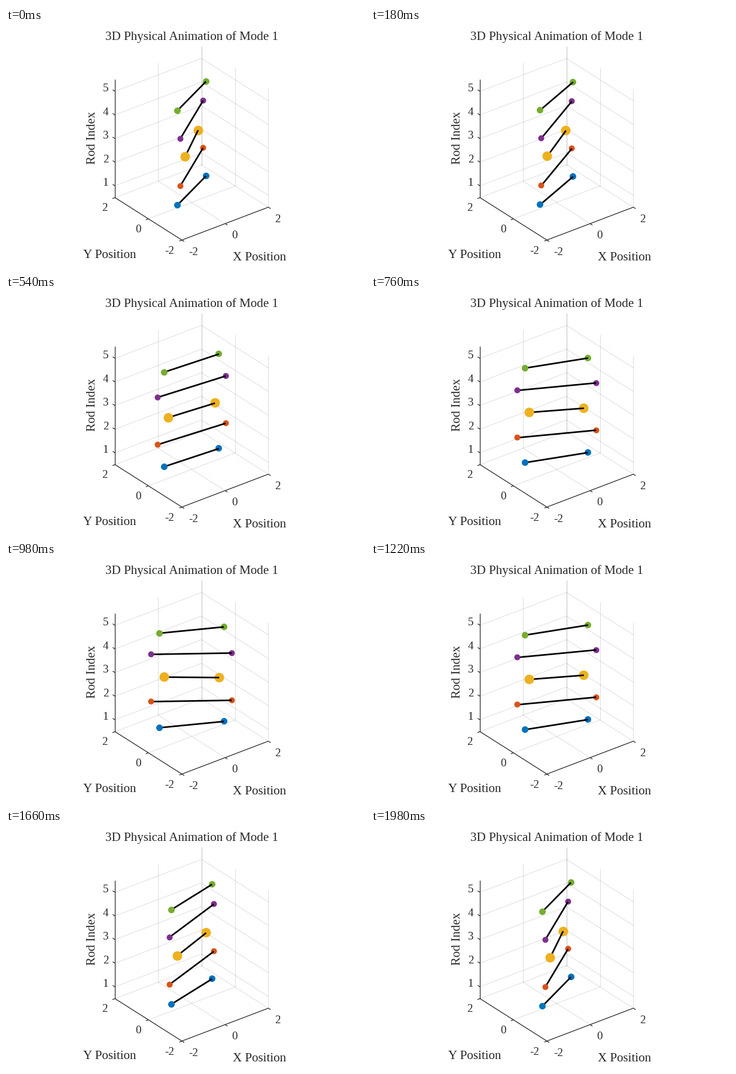
These frames come from a looping animation (600x400 px, 2000 ms). A matplotlib script:

```python
import numpy as np
import matplotlib.pyplot as plt
from matplotlib.animation import FuncAnimation
from matplotlib.patches import Circle

W, H, DPI = 600, 400, 100
FRAMES, INTERVAL = 100, 20
PT = 72 / DPI  # points per pixel
INK = "#262626"

# Orthographic projection: screen vectors of one data unit
CENTER = np.array([310.3, 291.9])
UX = np.array([36.125, -13.75])
UY = np.array([-27.95, -17.75])
UZ = np.array([0.0, -39.55])
ZMIN, ZMAX, LIM = 0.5, 5.5, 2
TICKS = (-2, 0, 2)
LEVELS = range(1, 6)

COLORS = ["#0072BD", "#D95319", "#EDB120", "#7E2F8E", "#77AC30"]
HALF_LENGTHS = [1.205, 1.475, 1.007, 1.475, 1.205]
SWINGS = np.radians([26.5, 35.9, 38.7, 35.9, 26.5])
DIAMETERS = [11, 10, 16, 10, 11]

plt.rcParams["font.family"] = "Liberation Serif"
fig = plt.figure(figsize=(W / DPI, H / DPI), dpi=DPI, facecolor="white")
ax = fig.add_axes([0, 0, 1, 1])
ax.set_xlim(0, W)
ax.set_ylim(H, 0)
ax.axis("off")


def project(x, y, z):
    return CENTER + x * UX + y * UY + (z - ZMIN) * UZ


def segment(p, q, **style):
    ax.plot(*zip(p, q), solid_capstyle="butt", **style)


def grid(*corners):
    points = [project(*c) for c in corners]
    ax.plot(*zip(*points), color=INK, alpha=0.15, lw=PT, zorder=1)


def axis_line(start, end):
    segment(project(*start), project(*end), color=INK, lw=1.2 * PT, zorder=2)


def tick(point, direction):
    p = project(*point)
    segment(p, p + 4.6 * direction / np.hypot(*direction),
            color=INK, lw=1.2 * PT, zorder=2)


def label(x, baseline, text, size=21, ha="center", **kw):
    ax.text(x, baseline, text, size=size * PT, color=INK,
            ha=ha, va="baseline", **kw)


def tick_label(point, offset, value, ha):
    label(*(project(*point) + offset), str(value), 19, ha)


def draw_box():
    for t in TICKS:
        grid((t, -LIM, ZMIN), (t, LIM, ZMIN))
        grid((-LIM, t, ZMIN), (LIM, t, ZMIN))
        grid((t, LIM, ZMIN), (t, LIM, ZMAX))
        grid((LIM, t, ZMIN), (LIM, t, ZMAX))
    for z in LEVELS:
        grid((-LIM, LIM, z), (LIM, LIM, z), (LIM, -LIM, z))

    axis_line((-LIM, -LIM, ZMIN), (LIM, -LIM, ZMIN))
    axis_line((-LIM, -LIM, ZMIN), (-LIM, LIM, ZMIN))
    axis_line((-LIM, LIM, ZMIN), (-LIM, LIM, ZMAX))

    for t in TICKS:
        tick((t, -LIM, ZMIN), -UY)
        tick((-LIM, t, ZMIN), -UX)
        tick_label((t, -LIM, ZMIN), (11, 25), t, "left")
        tick_label((-LIM, t, ZMIN), (-12.7, 22.6), t, "right")
    for z in LEVELS:
        tick((-LIM, LIM, z), UY)
        tick_label((-LIM, LIM, z), (-11, 0.3), z, "right")

    label(310.5, 20, "3D Physical Animation of Mode 1")
    label(423.5, 389, "X Position")
    label(173, 385, "Y Position")
    label(149, 184.3, "Rod Index", rotation=90, rotation_mode="anchor")


def make_dot(color, diameter, zorder):
    return ax.add_patch(Circle((0, 0), diameter / 2, fc=color, lw=0,
                               zorder=zorder))


def make_rod(color, diameter):
    bar, = ax.plot([], [], color="black", lw=2.67 * PT, zorder=4,
                   solid_capstyle="butt")
    return make_dot(color, diameter, 3), bar, make_dot(color, diameter, 5)


def pixel_center(p):
    return np.floor(p) + 0.5


draw_box()
rods = [make_rod(c, d) for c, d in zip(COLORS, DIAMETERS)]


def update(i):
    phase = np.cos(2 * np.pi * i / (FRAMES - 1))
    for z, (rod, r, swing) in enumerate(zip(rods, HALF_LENGTHS, SWINGS), 1):
        angle = swing * phase
        x, y = r * np.cos(angle), r * np.sin(angle)
        p, q = project(x, y, z), project(-x, -y, z)
        far, bar, near = rod
        far.set_center(pixel_center(p))
        near.set_center(pixel_center(q))
        bar.set_data([p[0], q[0]], [p[1], q[1]])
    return [part for rod in rods for part in rod]


anim = FuncAnimation(fig, update, frames=FRAMES, interval=INTERVAL,
                     repeat=True, repeat_delay=0, blit=False)
plt.show()
```
